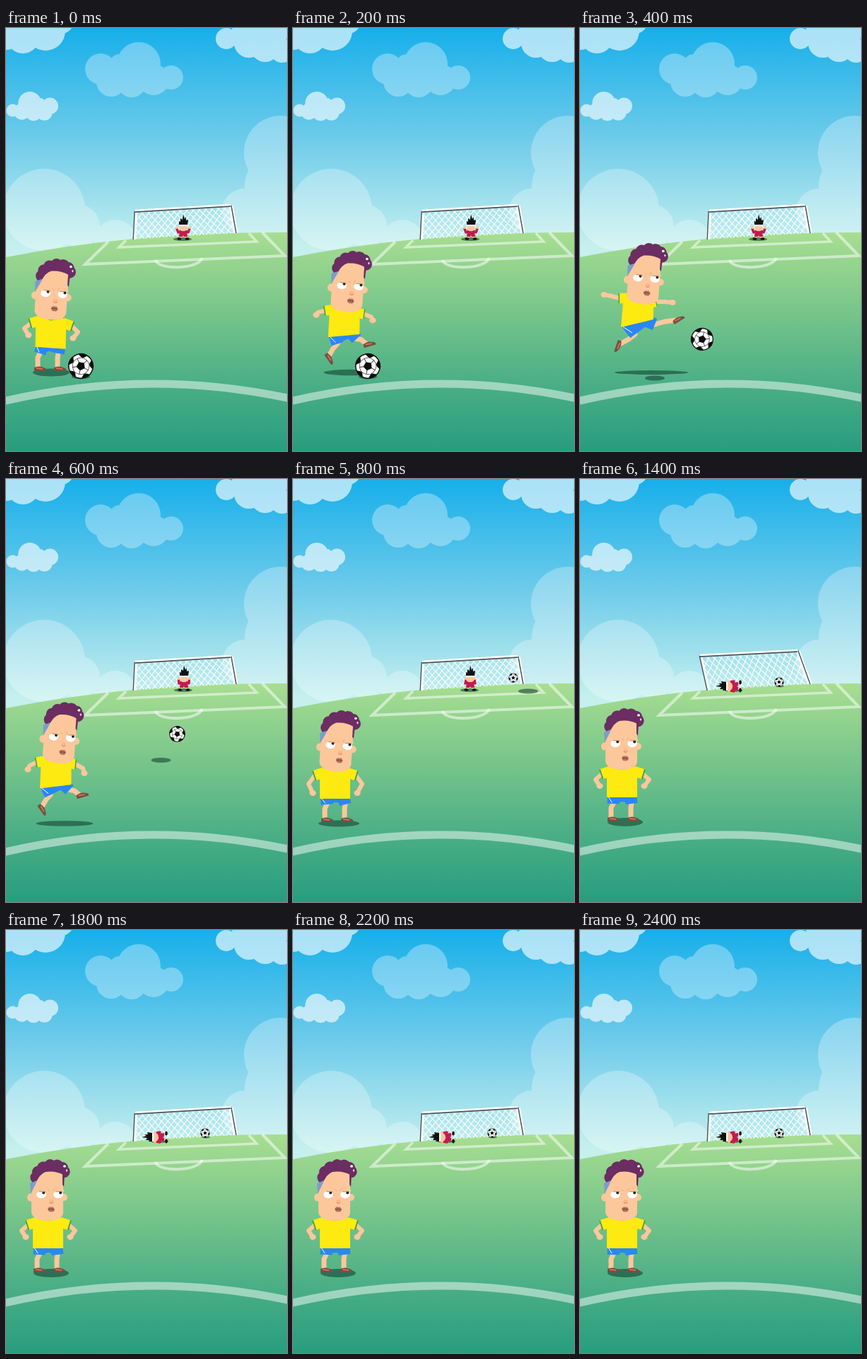
An HTML page with a canvas that plays this animation: 398 px wide and 598 px high, repeating every 7.2 s.

```html
<!DOCTYPE html>
<html lang="en">
<head>
<meta charset="utf-8">
<title>Penalty kick</title>
<style>
html, body { margin: 0; width: 100%; height: 100%; overflow: hidden; }
canvas { display: block; }
</style>
</head>
<body>
<canvas id="stage" width="398" height="598"></canvas>
<script>
const g = document.getElementById('stage').getContext('2d');
const SKIN = '#fcc79b', YELLOW = '#fdea10', BLUE = '#2b86f4', HAIR = '#6b2d62', RED = '#c8174f';
const GREEN = '#35a04b', STEEL = '#4d565b', SHADE = 'rgba(22,72,54,.62)';

const white = alpha => `rgba(255,255,255,${alpha})`;
const mix = (a, b, t) => Array.isArray(a) ? a.map((v, i) => mix(v, b[i], t)) : a + (b - a) * t;
const shift = (pts, dx, dy) => pts.map(([x, y]) => [x + dx, y + dy]);

// Value of a key list at a fractional index, holding the last key.
function keyAt(keys, k) {
  const i = Math.floor(k);
  return mix(keys[i], keys[Math.min(i + 1, keys.length - 1)], k % 1);
}

function shape(d, fill) {
  g.fillStyle = fill;
  g.fill(new Path2D(d));
}
function stroke(d, color, width, cap = 'butt') {
  g.strokeStyle = color;
  g.lineWidth = width;
  g.lineCap = cap;
  g.lineJoin = cap === 'round' ? 'round' : 'miter';
  g.stroke(new Path2D(d));
}
const track = pts => 'M' + pts.map(p => p.join(' ')).join('L');
const poly = (pts, fill) => shape(track(pts) + 'Z', fill);
const line = (pts, color, width, cap) => stroke(track(pts), color, width, cap);

function oval(x, y, rx, ry, fill) {
  g.fillStyle = fill;
  g.beginPath();
  g.ellipse(x, y, rx, ry, 0, 0, 7);
  g.fill();
}
function puffs(list, fill) {
  g.fillStyle = fill;
  g.beginPath();
  for (const [x, y, r] of list) {
    g.moveTo(x + r, y);
    g.arc(x, y, r, 0, 2 * Math.PI);
  }
  g.fill();
}
function fade(y0, y1, ...stops) {
  const f = g.createLinearGradient(0, y0, 0, y1);
  stops.forEach((c, i) => f.addColorStop(i / (stops.length - 1), c));
  return f;
}
function placed(x, y, turn, draw) {
  g.save();
  g.translate(x, y);
  g.rotate(turn);
  draw();
  g.restore();
}

const CLOUD = [[22, 38, 22], [76, 31, 31], [49, 32, 15], [37, 56, 21], [66, 57, 21], [97, 53, 22], [122, 50, 17]];

function scenery() {
  g.fillStyle = fade(0, 310, '#17afea', '#6dcbea', '#c6f0ee');
  g.fillRect(0, 0, 398, 598);

  puffs([[54, 257, 58], [103, 280, 30], [155, 301, 30]], white(.27));
  puffs([[389, 176, 52], [394, 225, 56], [338, 259, 32], [370, 290, 45]], white(.27));
  puffs(CLOUD.map(([x, y, r]) => [x + 112, y + 20, r]), white(.32));
  puffs(CLOUD.map(([x, y, r]) => [74 - x * .53, 90 + y * .53, r * .53]), white(.63));
  puffs([[0, 6, 25], [24, 13, 23], [56, 4, 28], [78, -10, 18]], white(.63));
  puffs([[312, 15, 15], [344, 21, 21], [367, 27, 21], [391, 32, 17], [370, 3, 30], [338, 4, 18]], white(.63));

  shape('M0 324Q180 288 398 289V598H0Z', fade(289, 598, '#a8de91', '#7bc78b', '#4eb086', '#279d7e'));

  stroke('M145 302L112 334L395 322L363 289', white(.52), 4);
  stroke('M170 300L160 310L355 302L344 290', white(.52), 3.5);
  stroke('M212 328C214 342 272 342 278 325', white(.52), 4);
  stroke('M-5 528Q200 480 403 524', white(.48), 11);
}

function goal(lean) {
  const tl = [183 - 13 * lean, 259 - 9 * lean], tr = [318 - 10 * lean, 251 - 8 * lean];
  const bl = [181, 299], br = [325, 290];
  const at = (u, v) => mix(mix(tl, tr, u), mix(bl, br, u), v);

  g.save();
  g.clip(new Path2D(track([tl, tr, br, bl]) + 'Z'));
  for (let u = -.28; u < 1.3; u += .066) {
    line([at(u, 0), at(u + .25, 1)], white(.85), 1.3);
    line([at(u + .25, 0), at(u, 1)], white(.85), 1.3);
  }
  g.restore();

  const left = [bl, tl], right = [tr, br], bar = [tl, tr];
  line(shift(left, 1.5, 0), '#fff', 3);
  line(shift(left, -.8, 0), STEEL, 1.4);
  line(shift(right, -1, 0), '#fff', 3);
  line(shift(right, 1.2, 0), STEEL, 1.8);
  line(shift(right, 2.8, 0), '#fff', 1.8);
  line(shift(bar, 0, -.8), '#fff', 3);
  line(shift(bar, 0, 1.2), STEEL, 1.8);
}

function keeper([x, y, turn, raised]) {
  oval(x - 1 - turn * 4, 298.5, 13, 2.6, SHADE);
  placed(x, y, turn, () => {
    const reach = mix(9, 6, raised);
    for (const s of [-1, 1]) {
      line([[s * 3, 9], [s * 4, 14]], SKIN, 2.6);
      oval(s * 5.5, 15, 3, 1.8, '#151515');
      line([[s * 3, 4], [s * 7, 6], [s * reach, 1]], RED, 3.4, 'round');
      oval(s * reach, -1, 2, 2, SKIN);
    }
    shape('M-5 3H5L6 12H1L0 10L-1 12H-6Z', RED);
    oval(0, 0, 5.8, 4.2, SKIN);
    shape('M-6 -4L-6 -10L-4 -9L-4 -14L-1 -12L0 -20L2 -13L4 -16L4 -11L7 -12L6 -4Z', '#111');
    shape('M-6 -5H6V-2.8H-6Z', '#fff');
  });
}

function ball([x, y, r, turn, sx, sy, srx]) {
  oval(sx, sy, srx, srx * .25, SHADE);
  placed(x, y, turn, () => {
    const fifth = 2 * Math.PI / 5;
    const ray = (a, d) => [Math.cos(a) * d, Math.sin(a) * d];
    const patch = (center, a) => poly(shift([0, 1, 2, 3, 4].map(i => ray(a + i * fifth, .36)), ...center), '#0c0c0c');
    g.scale(r, r);
    oval(0, 0, 1, 1, '#fff');
    g.save();
    g.clip();
    patch([0, 0], 0);
    for (let a = 0; a < 6; a += fifth) {
      patch(ray(a + fifth / 2, .98), a + fifth / 2 + Math.PI);
      line([ray(a, .3), ray(a, .66)], '#333', .05);
      line([ray(a, .66), ray(a + fifth / 2, .7), ray(a + fifth, .66)], '#555', .05);
    }
    g.restore();
    g.lineWidth = .09;
    g.strokeStyle = '#111';
    g.beginPath();
    g.arc(0, 0, .96, 0, 7);
    g.stroke();
  });
}

function head([dx, dy], tilt) {
  placed(64 + dx, 375 + dy, tilt, () => {
    g.translate(-64, -375);
    const curls = [0, 1, 2, 3, 4, 5, 6].map(i =>
      [62.5 - 19.5 * Math.cos(i * Math.PI / 6), 350 - i * 1.4 - 13 * Math.sin(i * Math.PI / 6), 8.7]);
    puffs([...curls, [62, 344, 13]], HAIR);
    shape('M34 358L44 354V372H35Z', '#7d9dc9');
    oval(35, 378, 5, 5.5, SKIN);
    oval(82, 378, 5, 5, SKIN);
    shape('M42 359Q47 345 56 342Q70 340 81 346V400Q79 411 59 411Q36 410 36 398V371Z', SKIN);
    shape('M80 345H83L82 363L80 360Z', HAIR);
    oval(83, 334, 2, 1.7, '#fff');
    oval(86, 340, 1.2, 1.7, '#e6d3e4');

    for (const x of [50, 74]) {
      oval(x, 374, 6.8, 5.3, '#fff');
      oval(x + 3.2, 371.5, 2, 2, '#222');
      shape(`M${x - 8} 367h16v3h-16Z`, SKIN);
    }
    stroke('M47 369.8L56 370M70 370L79 369.6', '#a9765a', .8);
    stroke('M59 367L62 369M69 365L67 369', '#eeaa80', 1);
    oval(64.5, 384, 3.2, 3, '#fbb58a');
    stroke('M62 385Q65 388 67 385', '#e58d68', 1.1);
    shape('M59 394Q62 390 64 392Q67 390 69 395Q67 400 64 398Q61 400 59 394Z', '#b1705f');
    stroke('M60 395Q64 393.5 68 395.5', '#764338', 1);
  });
}

// A pose: head offset, tilt, shirt corners, arms, legs, shoe turns, shadow place, shadow size.
const SHIRT = [[38, 407], [81, 407], [81, 450], [38, 450]];
const ARMS = [[[31, 417], [22, 425], [28, 434]], [[89, 417], [98, 425], [91, 434]]];
const LEGS = [[[47, 459], [44, 465], [44, 480]], [[73, 459], [72, 465], [72, 480]]];
const STAND = [[0, 0], 0, SHIRT, ARMS, LEGS, [0, 0], [64, 485], [25, 6]];

const KICK = [
  [32, -20], .07,
  [[62, 376], [104, 383], [104, 412], [58, 423]],
  [[[56, 382], [45, 379], [34, 377]], [[107, 387], [120, 387], [131, 388]]],
  [[[78, 433], [69, 440], [56, 447]], [[106, 419], [120, 415], [136, 413]]],
  [1.9, -.56], [101, 487], [52, 3]
];

const lean = ([x, y]) => [x + 3.5 + (450 - y) * .02, y + 2 + (x - 55) * .07];
const sag = ([x, y], i) => [x, y + 2 + 4 * i];
const steps = LEGS.map(leg => shift(leg, 1, 1));
const READY = [[6, 2], .07, SHIRT.map(lean), ARMS.map(arm => arm.map(lean)), steps, [0, 0], [64, 487], [26, 5.5]];
const LAND = [[3, 3], .07, shift(SHIRT, 0, 2), ARMS.map(arm => arm.map(sag)), steps, [0, 0], [65, 487], [29, 4.5]];
const POSES = [READY, KICK, LAND, STAND];

function player([face, tilt, shirt, arms, legs, turns, spot, size]) {
  const [shL, shR, hipR, hipL] = shirt;
  oval(...spot, ...size, SHADE);

  legs.forEach(([hem, knee, foot], i) => {
    line([hem, knee, foot], SKIN, 7, 'round');
    placed(...foot, turns[i], () => {
      shape('M-5 -1Q2 -4 8 -1Q14 1 12 4H-5Z', '#745044');
      stroke('M-2 0L7 1', '#e0664c', 2);
    });
    line([mix(hipL, hipR, .22 + i * .57), hem], BLUE, 17);
  });
  const hemL = legs[0][0], hemR = legs[1][0], [cx, cy] = mix(hemL, hemR, .5);
  poly([hipL, hipR, hemR, [cx, cy - 3], hemL], BLUE);
  line([mix(hipL, hipR, .06), mix(hipL, hemL, .8)], '#fff', 1);

  arms.forEach(([cuff, elbow, hand], i) => {
    line([cuff, elbow, hand], SKIN, 6, 'round');
    oval(...hand, 4.6, 4, SKIN);
    const [x, y] = i ? shR : shL, root = [x + 5 - 10 * i, y + 6];
    line([root, mix(root, cuff, 1.13)], GREEN, 14);
    line([root, cuff], YELLOW, 14.5);
  });
  poly(shirt, YELLOW);
  const [nx, ny] = mix(shL, shR, .5);
  line([mix(shL, shR, .22), [nx, ny + 3], mix(shL, shR, .8)], GREEN, 2.4);
  head(face, tilt);
}

// x, y, radius, turn, then shadow x, y, radius
const BALL = [
  [106, 478, 18, .5, 106, 493, 13],
  [173, 440, 16, 1.2, 106, 495, 14],
  [312, 281, 6.5, 2.2, 333, 300, 14],
  [282, 271, 6.5, 2.9, 282, 293, 5]
];
const BALL_REST = [282, 287, 6.5, 3.4, 283, 293, 6];

// x, y, turn, how far the hands are raised
const KEEPER = [[251, 283, 0, 0], [253, 283, 0, 0], [251, 283, 0, 1], [212, 293, -1.57, 1]];

const LEAN = { 6: .42, 7: 1, 8: .45 };

function frame() {
  const step = Math.min(Math.floor(performance.now() % 7200 / 200), 12);
  const k = Math.min(step, 6) / 2;
  scenery();
  goal(LEAN[step] || 0);
  keeper(keyAt(KEEPER, k));
  player(keyAt(POSES, k));
  ball(step > 6 ? BALL_REST : keyAt(BALL, step === 1 ? 0 : k));
  requestAnimationFrame(frame);
}
frame();
</script>
</body>
</html>
```
